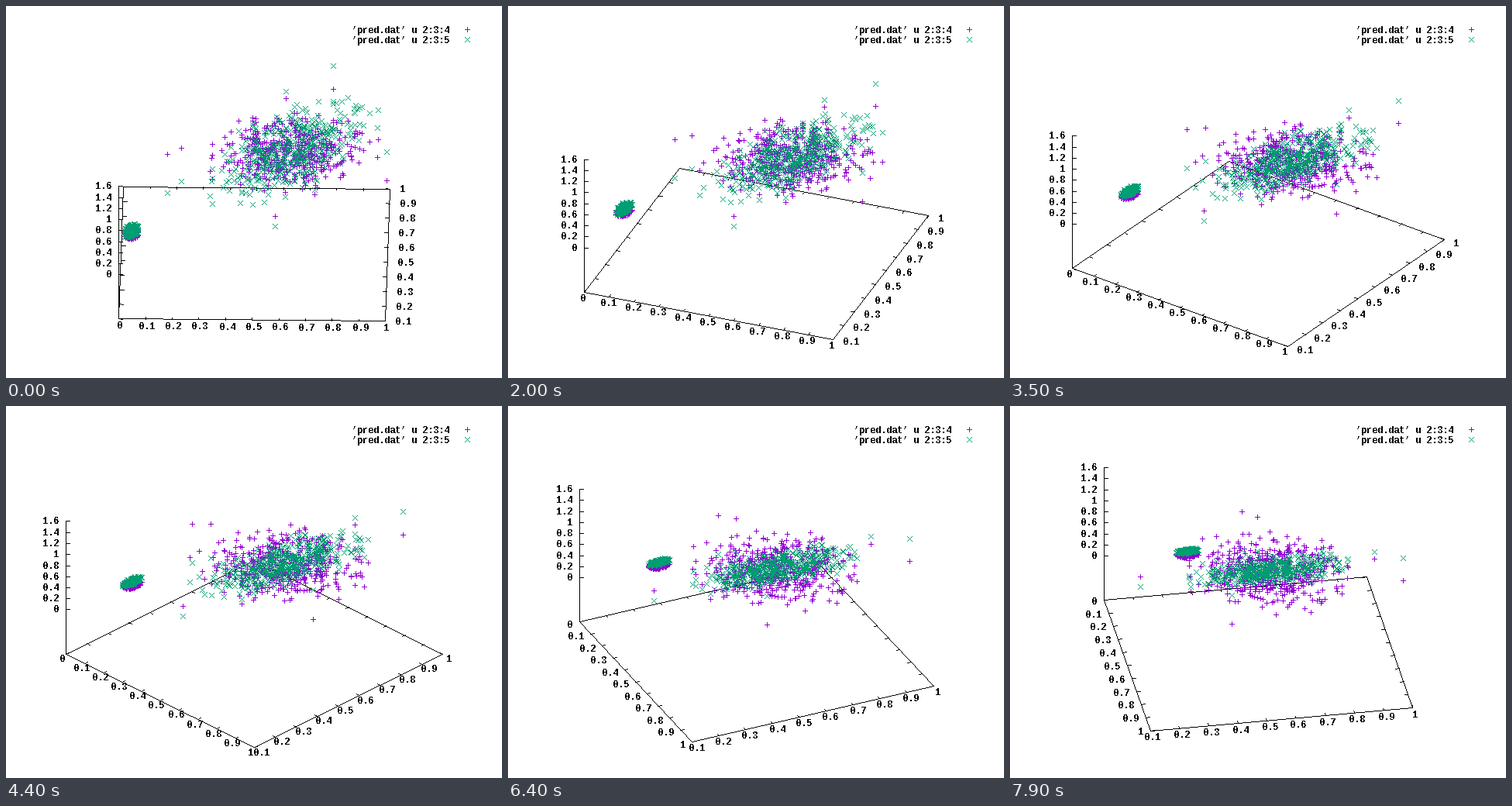
These frames come from a looping animation (640 by 480 pixels, 8000 ms). A matplotlib script:

```python
import numpy as np
import matplotlib.pyplot as plt
from matplotlib.animation import FuncAnimation

W, H = 640, 480
FRAMES, INTERVAL = 80, 100
BLACK, PURPLE, GREEN = (0, 0, 0), (148, 0, 211), (0, 158, 115)
CX, CY = 320.2, 319.5       # centre of the base plane
SX, SY, SZ = 344, 171, 171  # axis lengths on screen
FLOOR, TOP = -.8, 1.6       # height range in data units

plt.rcParams.update({
    "font.family": "Liberation Mono",
    "text.antialiased": False,
    "text.hinting": "force_autohint",
    "text.hinting_factor": 1,
})

rng = np.random.default_rng(5)


def cluster(n, centre, spread, limit):
    """Normal points inside a radius of `limit` deviations."""
    p = rng.normal(size=(3 * n, 2))
    p = p[np.hypot(*p.T) < limit][:n]
    return np.clip(np.array(centre) + p * spread, 0, 1)


small = cluster(420, (.041, .31), (.012, .019), 2.3)
cloud = cluster(470, (.63, .515), (.125, .13), 2.8)
far = [(.174, .495), (.224, .545), (.788, 1), (.61, .924), (.587, .035),
       (1, .31)]

px, py = np.vstack([small, cloud, far]).T
label = np.where(px > .15, 1.0, 0.0)
fit = .05 + 1.53 * px + .3 * (py - .5) + rng.normal(0, .012, px.size)

arm = np.arange(-3, 4)
PLUS = np.hstack([[arm, 0 * arm], [0 * arm, arm]])
CROSS = np.hstack([[arm, arm], [arm, -arm]])


def project(x, y, z, th):
    """Screen position; x and y run 0..1 along the base."""
    c, s = np.cos(th), np.sin(th)
    x, y, z = np.broadcast_arrays(x, y, z)
    x, y = x - .5, y - .5
    sx = CX + SX * (x * c + y * s)
    sy = CY + SY * (x * s - y * c) - SZ * (z - FLOOR) / (TOP - FLOOR)
    return sx, sy


def line(img, x0, y0, x1, y1):
    """Thin line without smoothing."""
    x0, y0, x1, y1 = (int(round(v)) for v in (x0, y0, x1, y1))
    n = max(abs(x1 - x0), abs(y1 - y0)) + 1
    xs = np.rint(np.linspace(x0, x1, n)).astype(int)
    ys = np.rint(np.linspace(y0, y1, n)).astype(int)
    img[ys, xs] = BLACK


def path(img, sx, sy):
    for k in range(len(sx) - 1):
        line(img, sx[k], sy[k], sx[k + 1], sy[k + 1])


def ticks(img, pts, dx, dy):
    for x, y in zip(*pts):
        line(img, x, y, x + dx, y + dy)


def marks(img, sx, sy, shape, color):
    xs = np.rint(sx).astype(int)[:, None] + shape[0]
    ys = np.rint(sy).astype(int)[:, None] + shape[1]
    img[ys, xs] = color


fig = plt.figure(figsize=(6.4, 4.8), dpi=100, facecolor="white")
ax = fig.add_axes([0, 0, 1, 1])
ax.axis("off")
blank = np.full((H, W, 3), 255, np.uint8)
view = ax.imshow(blank, extent=(0, W, H, 0), aspect="auto",
                 interpolation="nearest")


def write(text, x=0, y=0, ha="center"):
    # 11.67 px type gives a 7 px advance
    return ax.text(x, y, text, ha=ha, va="baseline", weight="bold",
                   size=11.67 * .72, color="black")


for row, (column, shape, color) in enumerate([(4, PLUS, PURPLE),
                                              (5, CROSS, GREEN)]):
    y = 30 + 13 * row
    write(f"’pred.dat’ u 2:3:{column}", 572, y + 5, "right")
    marks(blank, np.array([595]), np.array([y]), shape, color)

x_vals = np.arange(11) / 10
y_vals = np.arange(1, 11) / 10
z_vals = np.arange(9) / 5
x_text, y_text, z_text = ([write(f"{v:g}") for v in vals]
                          for vals in (x_vals, y_vals, z_vals))
SHIFT = {"left": 4, "center": 2, "right": 0}


def place(texts, pts, dx, dy, ha):
    for t, x, y in zip(texts, *pts):
        t.set_ha(ha)
        t.set_position((round(x + dx + SHIFT[ha]), round(y + dy + 4)))


def update(i):
    deg = i + 1
    th = np.radians(deg)
    c, s = np.cos(th), np.sin(th)
    img = blank.copy()

    # base, height axis and tick marks
    path(img, *project([0, 1, 1, 0, 0], [0, 0, 1, 1, 0], FLOOR, th))
    path(img, *project(0, 0, [FLOOR, TOP], th))
    yn = (y_vals - .1) / .9
    x_front = project(x_vals, 0, FLOOR, th)
    y_front = project(1, yn, FLOOR, th)
    z_axis = project(0, 0, z_vals, th)
    ticks(img, x_front, 5 * s, -2.5 * c)
    ticks(img, project(x_vals, 1, FLOOR, th), -5 * s, 2.5 * c)
    ticks(img, y_front, -5 * c, -2.5 * s)
    ticks(img, project(0, yn, FLOOR, th), 5 * c, 2.5 * s)
    ticks(img, z_axis, 5, 0)

    place(x_text, x_front, -9 * s, 9 * c, "right" if deg > 45 else "center")
    place(y_text, y_front, 9 * c, 9 * s, "left" if deg < 45 else "center")
    place(z_text, z_axis, -9, 0, "right")

    marks(img, *project(px, py, label, th), PLUS, PURPLE)
    marks(img, *project(px, py, fit, th), CROSS, GREEN)
    view.set_data(img)
    return [view, *x_text, *y_text, *z_text]


anim = FuncAnimation(fig, update, frames=FRAMES, interval=INTERVAL,
                     repeat=True, repeat_delay=0, blit=False)
plt.show()
```
